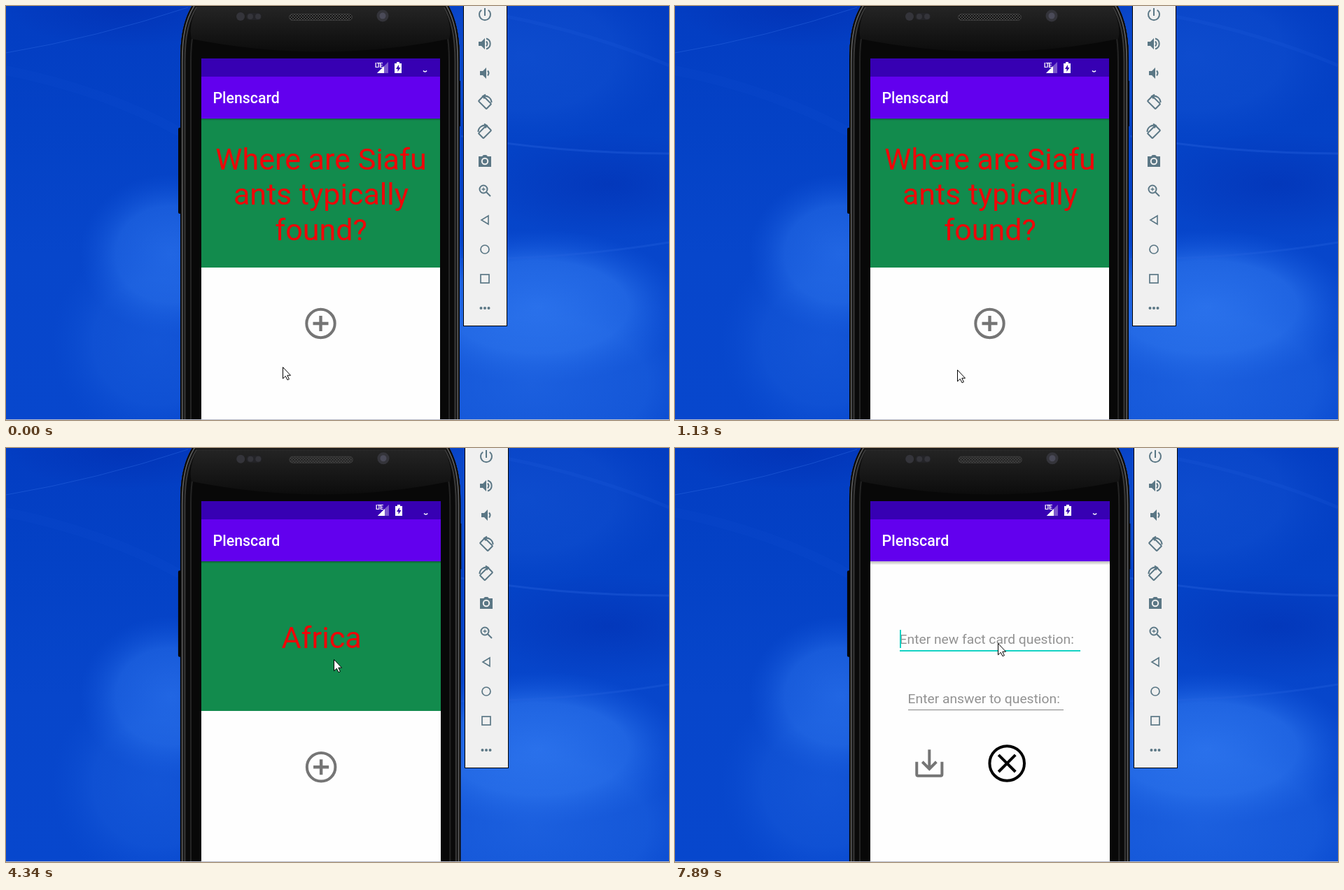
Recreate the animation shown at these times as an HTML page. Size 947x592 px, loop 8 s.

```html
<!DOCTYPE html>
<html lang="en">
<head>
<meta charset="utf-8">
<title>Study card demo</title>
<style>
  html, body { margin: 0; width: 100%; height: 100%; overflow: hidden; background: #0440c6; }
  svg { display: block; width: 947px; height: 592px; }
  text { font-family: Roboto, sans-serif; }
  .card { font-size: 43px; fill: #f00408; text-anchor: middle; }
  .hint { font-size: 19.2px; fill: #929292; }
  .line { fill: none; stroke-width: 4; }
  .tools g { fill: none; stroke: #5b7785; stroke-width: 2; }
  .tools .solid { fill: #5b7785; stroke: none; }
  .crisp { shape-rendering: crispEdges; }
</style>
</head>
<body>
<svg viewBox="0 0 947 592">
  <defs>
    <linearGradient id="sky" x2="0" y2="1">
      <stop stop-color="#033dc2"/><stop offset=".3" stop-color="#0442c6"/>
      <stop offset=".6" stop-color="#0746cb"/><stop offset="1" stop-color="#0747cd"/>
    </linearGradient>
    <radialGradient id="glow">
      <stop stop-color="#3078f0"/><stop offset=".6" stop-color="#2970ea" stop-opacity=".8"/>
      <stop offset="1" stop-color="#155ade" stop-opacity="0"/>
    </radialGradient>
    <radialGradient id="dim">
      <stop stop-color="#0230b2"/><stop offset="1" stop-color="#0230b2" stop-opacity="0"/>
    </radialGradient>
    <linearGradient id="gloss" x2="0" y2="1">
      <stop stop-color="#242424"/><stop offset="1" stop-color="#0c0c0c"/>
    </linearGradient>
    <linearGradient id="shade" x2="0" y2="1">
      <stop stop-opacity=".28"/><stop offset="1" stop-opacity="0"/>
    </linearGradient>
    <pattern id="mesh" width="4" height="4" patternUnits="userSpaceOnUse">
      <rect width="4" height="4" fill="#111"/><path d="M0 0L4 4M4 0L0 4" stroke="#444"/>
    </pattern>
    <path id="shell" d="M249 640V80C249 42 254 18 268 -4H630C643 18 648 42 648 80V640Z"/>
    <clipPath id="shellClip"><use href="#shell"/></clipPath>
    <g id="appBar">
      <rect class="crisp" x="279" y="101" width="341" height="60" fill="#6200ee"/>
      <text x="295.5" y="138.5" font-size="21.3" font-weight="500" fill="#fff">Plenscard</text>
    </g>
    <g id="rotate">
      <rect x="-5" y="-8" width="10" height="16" rx="1" transform="rotate(45)"/>
      <path d="M-9.5 0a9.5 9.5 0 0 1 12-9M-1-11.5l4 2.5-2.5 3.5"/>
    </g>
  </defs>

  <rect width="947" height="592" fill="url(#sky)"/>
  <ellipse cx="170" cy="0" rx="170" ry="60" fill="url(#dim)" opacity=".7"/>
  <ellipse cx="860" cy="255" rx="190" ry="75" fill="url(#dim)" opacity=".6"/>
  <ellipse cx="740" cy="70" rx="220" ry="130" fill="url(#glow)" opacity=".22"/>
  <ellipse cx="235" cy="355" rx="130" ry="115" fill="url(#glow)" opacity=".65"/>
  <ellipse cx="215" cy="480" rx="150" ry="150" fill="url(#glow)" opacity=".3"/>
  <ellipse cx="760" cy="430" rx="215" ry="110" fill="url(#glow)" opacity=".9"/>
  <ellipse cx="750" cy="540" rx="280" ry="160" fill="url(#glow)" opacity=".5"/>
  <g fill="none" stroke="#2b66e0" opacity=".5">
    <path d="M0 67Q130 45 260 2"/>
    <path d="M0 92Q140 120 248 180" stroke-width="14" opacity=".15"/>
    <path d="M715 15Q840 40 947 85" stroke-width="5" opacity=".3"/>
    <path d="M650 186Q780 210 947 211" stroke-width="3" opacity=".7"/>
    <path d="M650 362Q800 362 947 338" stroke-width="3" opacity=".6"/>
  </g>

  <g id="phone">
    <path d="M246 176q0-2 2-2h3v123h-3q-2 0-2-2zM646 107h3v65h-3z" fill="#050505"/>
    <use href="#shell" fill="#080808"/>
    <g id="rim" clip-path="url(#shellClip)" fill="none"></g>
    <path d="M273 2H625Q638 30 633 47Q450 84 265 47Q260 28 273 2Z" fill="url(#gloss)"/>
    <rect x="404.5" y="11.5" width="90" height="9" rx="4.5" fill="url(#mesh)" stroke="#3c3c3c"/>
    <g fill="#34343a">
      <circle cx="335" cy="15" r="6"/><rect x="343" y="10" width="22" height="10" rx="5" fill="#242428"/>
      <circle cx="349" cy="15" r="4"/><circle cx="360" cy="15" r="4"/>
      <circle cx="538" cy="14" r="8.5"/><circle cx="538" cy="14" r="4.5" fill="#4a4a58"/>
    </g>
    <g class="crisp">
      <rect x="279" y="76" width="341" height="540" fill="#fefefe"/>
      <rect x="279" y="75.4" width="341" height="25.6" fill="#3700b3"/>
      <rect x="279" y="161" width="341" height="213" fill="#128b4d"/>
      <rect x="279" y="161" width="341" height="3" fill="url(#shade)"/>
    </g>
    <use href="#appBar"/>
    <g fill="#fff">
      <text x="527" y="87.5" font-size="8.5" font-weight="700" letter-spacing="-1.3">LTE</text>
      <path d="M530 96L546 80V96Z" opacity=".35"/><path d="M530 96L540 86V96Z"/>
      <path d="M555 82h3v-2h4v2h3v14h-10z"/>
      <path d="M561 84l-4 6h2.5v4l4-6h-2.5z" fill="#3700b3"/>
      <path d="M596 92.5q2.5 3 5 0" fill="none" stroke="#fff" stroke-width="1.6"/>
    </g>
    <g id="question" class="card">
      <text x="450" y="233.8">Where are Siafu</text>
      <text x="450" y="284.3">ants typically</text>
      <text x="450" y="334.7">found?</text>
    </g>
    <text id="answer" class="card" x="450" y="284.3">Africa</text>
    <g class="line" stroke="#757575">
      <circle cx="449.5" cy="454" r="20.2"/><path d="M438.5 454h22M449.5 443v22" stroke-width="4.4"/>
    </g>
    <g id="form">
      <rect class="crisp" x="279" y="161" width="341" height="440" fill="#fefefe"/>
      <rect x="279" y="161" width="341" height="5" fill="url(#shade)"/>
      <use href="#appBar"/>
      <text class="hint" x="320.4" y="278.5">Enter new fact card question:</text>
      <text class="hint" x="332.4" y="363">Enter answer to question:</text>
      <path class="crisp" d="M321 258.4h2v26h-2zM321 286.9h257v2h-257z" fill="#14d2c4"/>
      <rect class="crisp" x="333" y="371.7" width="221" height="1" fill="#858585"/>
      <path class="line" stroke="#757575" d="M345 446.5V464.5q0 2 2 2H379q2 0 2-2V446.5M363 429V456M353 446.5L363 456.5 373 446.5"/>
      <g class="line" stroke="#000">
        <circle cx="473.5" cy="448.7" r="24.7"/><path d="M461.5 436.7l24 24M485.5 436.7l-24 24"/>
      </g>
    </g>
  </g>

  <g id="toolbar" class="tools">
    <rect x="653.5" y="-2" width="62" height="459.5" fill="#f0f0f0" stroke="#000"/>
    <g transform="translate(684 12)"><path d="M0-9V2M-4.8-6.2a8 8 0 1 0 9.6 0"/></g>
    <g transform="translate(684 54)">
      <path class="solid" d="M-9-3h4l5-5V8l-5-5h-4z"/><path d="M2-3.5q3 3.5 0 7M2-7.5a7.8 7.8 0 0 1 0 15"/>
    </g>
    <g transform="translate(684 96)">
      <path class="solid" d="M-7-3h4l5-5V8l-5-5h-4z"/><path d="M4-3.5q3 3.5 0 7"/>
    </g>
    <g transform="translate(684 138) scale(-1 1)"><use href="#rotate"/></g>
    <g transform="translate(684 180)"><use href="#rotate"/></g>
    <g transform="translate(684 222)">
      <path class="solid" d="M-9-7h5l2-2h4l2 2h5V8H-9z"/><circle r="4.2" stroke="#f0f0f0"/>
    </g>
    <g transform="translate(684 264)">
      <circle cx="-2" cy="-2" r="5.5"/><path d="M2 2L8 8"/><path d="M-4.5-2h5M-2-4.5v5" stroke-width="1.3"/>
    </g>
    <g transform="translate(684 306)"><path d="M5-6V6L-5 0Z" stroke-width="1.6"/></g>
    <g transform="translate(684 348)"><circle r="6" stroke-width="1.7"/></g>
    <g transform="translate(684 390)"><rect x="-6" y="-6" width="12" height="12" stroke-width="1.7"/></g>
    <g transform="translate(684 432)">
      <path d="M-5.5 0h0M0 0h0M5.5 0h0" stroke-width="4" stroke-linecap="round"/>
    </g>
  </g>

  <rect id="selection" class="crisp" x="245" y="-4" height="604" fill="rgb(0 190 166 / .26)" stroke="#10bfae" stroke-width="2"/>
  <rect y="591" width="947" height="1" fill="#b9bccb"/>
  <g id="pointer" fill="#fff" stroke="#000">
    <path id="arrow" d="M.5 .5V16.8L4.3 13.3 7 18.7 9.4 17.6 6.8 12.2H11.5Z"/>
    <path id="resize" d="M-7.5-7.5H-1.5L-3.5-5.2 5.2 3.5 7.5 1.5V7.5H1.5L3.5 5.2-5.2-3.5-7.5-1.5Z"/>
  </g>
</svg>

<script>
const LOOP = 8000;
const el = id => document.getElementById(id);
const show = (id, on) => el(id).style.display = on ? '' : 'none';
const between = (t, from, to) => t >= from && t < to;
const current = (steps, t) => steps.findLast(step => step[0] <= t);

// time, x, y
const pointerSteps = [
  [0, 395, 516], [120, 380, 543], [260, 395, 533], [410, 428, 509],
  [550, 430, 509.5], [700, 450, 507], [830, 468, 504], [980, 480, 500],
  [1130, 403, 520], [1280, 345, 523], [1400, 508, 524],
  [1550, 495, 440], [1670, 480, 370], [1790, 468, 315], [3210, 468, 302],
  [6410, 462, 345], [6530, 448, 405], [6650, 430, 461], [6800, 436, 461],
  [6920, 442, 461], [7890, 461, 279]
];
// time, right edge of the resize preview
const previewSteps = [[0, 608], [700, 605], [830, 602], [980, 599]];

// Nested strokes build the bezel from the inside out.
for (const [depth, color] of [[16, '#242424'], [14, '#0a0a0a'], [7.5, '#383838'],
                              [5.5, '#101010'], [3.6, '#5a5a5a'], [1.8, '#050505']]) {
  el('rim').insertAdjacentHTML('beforeend',
    `<use href="#shell" stroke="${color}" stroke-width="${depth * 2}"/>`);
}

function render(t) {
  const resizing = between(t, 550, 1130);
  const enlarged = t >= 1550;
  const answered = between(t, 4340, 4460) || between(t, 5140, 6130);
  const entering = between(t, 7620, 7750);

  el('phone').setAttribute('transform', enlarged ? 'matrix(1.0035 0 0 1.0035 -.95 .7)' : '');
  el('toolbar').setAttribute('transform', enlarged ? 'translate(2)' : '');
  show('question', !answered);
  show('answer', answered);

  show('form', t >= 7620);
  el('form').setAttribute('transform', entering ? 'translate(0 7)' : '');
  el('form').setAttribute('opacity', entering ? .9 : 1);

  show('selection', resizing);
  el('selection').setAttribute('width', current(previewSteps, t)[1] - 245);

  const [, x, y] = current(pointerSteps, t);
  el('pointer').setAttribute('transform', `translate(${x} ${y})`);
  show('arrow', !resizing);
  show('resize', resizing);
}

const start = performance.now();
function tick() {
  render((performance.now() - start) % LOOP);
  requestAnimationFrame(tick);
}
tick();
</script>
</body>
</html>
```
